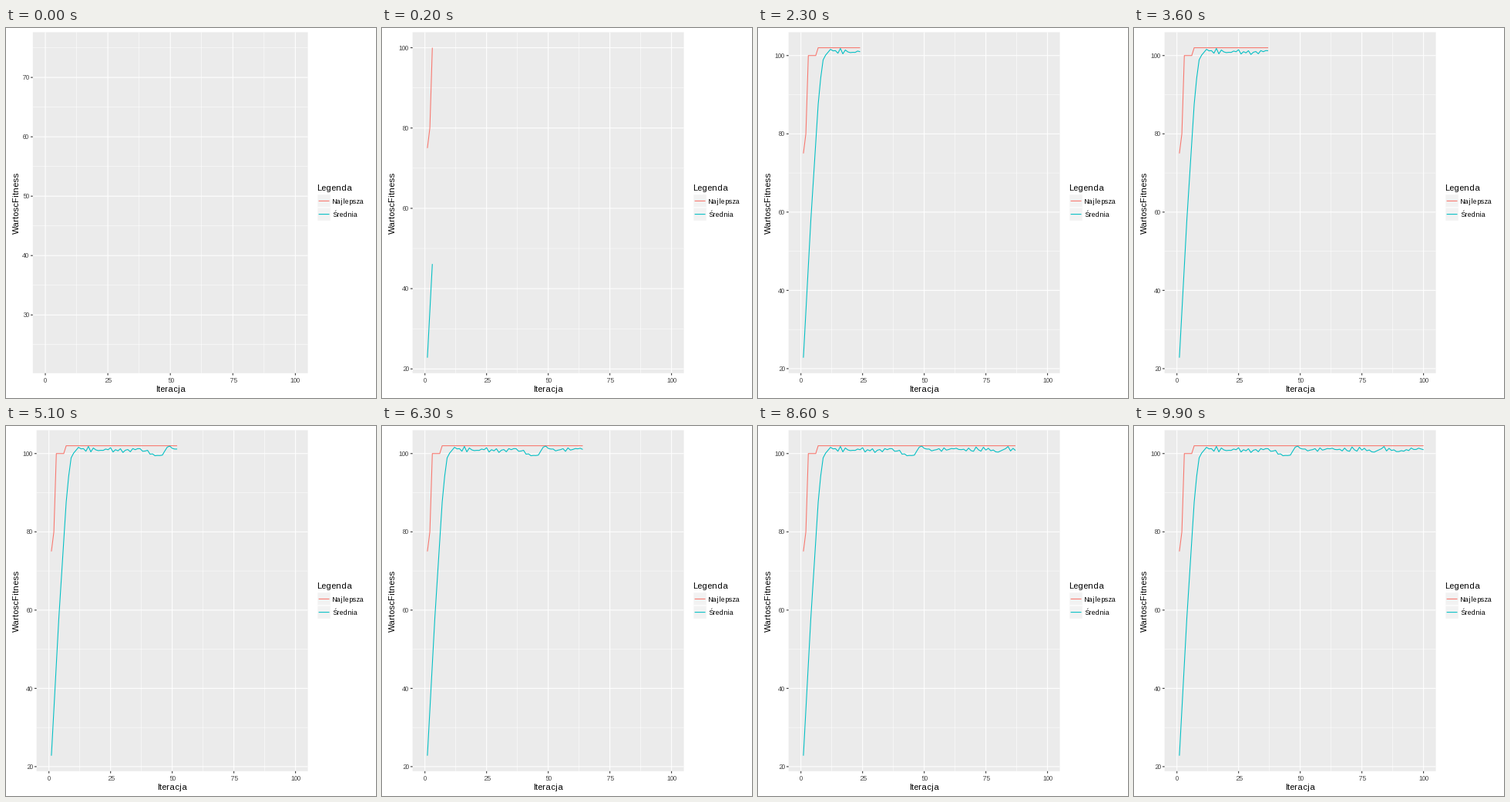
A matplotlib script for the animation above (10 s loop, 480x480 px).

```python
import numpy as np
import matplotlib.pyplot as plt
from matplotlib.animation import FuncAnimation
from matplotlib.patches import Rectangle

SIZE, DPI = 480, 100
PX = 72 / DPI  # points per pixel
TOP, BOTTOM, RIGHT = 5.5, 447.8, 391.6
RED, TEAL = "#F8766D", "#00BFC4"
THICK, THIN = 1.07, 0.53
SMALL, LARGE = 9, 11

plt.rcParams.update({
    "font.family": "Liberation Sans",
    "path.snap": False,
    "text.hinting": "force_autohint",
    "text.hinting_factor": 1,
    "lines.solid_capstyle": "butt",
    "lines.solid_joinstyle": "round",
})

# Best value climbs in jumps; the mean rises, then jitters on a plateau.
steps = np.arange(1, 101)
best = np.interp(steps, [1, 2, 3, 6, 7], [75, 80, 100, 100, 102])
mean = np.interp(steps,
                 [1, 4, 7, 8, 9, 10, 12, 13, 40, 41, 46, 48, 50, 52],
                 [22.8, 57.8, 87.6, 94.2, 98.9, 100.1, 101.6, 101.1,
                  100.9, 99.6, 99.8, 101.7, 101.5, 101])
jitter = np.random.default_rng(4).normal(0, 0.33, 100)
mean = np.minimum(mean + np.where(steps > 12, jitter, 0), 101.9)

fig = plt.figure(figsize=(SIZE / DPI, SIZE / DPI), dpi=DPI, facecolor="white")
ax = fig.add_axes([0, 0, 1, 1])


def line(x, y, color, width=THICK):
    ax.plot(x, y, color=color, lw=width * PX)


def label(x, y, text, size=SMALL, color="black", ha="left", rotation=0):
    ax.text(x, y, text, fontsize=size * PX, color=color, ha=ha,
            va="baseline", rotation=rotation, rotation_mode="anchor")


def box(x, y, w, h, face, edge="none"):
    ax.add_patch(Rectangle((x, y), w, h, facecolor=face, edgecolor=edge,
                           lw=THICK * PX))


def multiples(step, low, high, offset=0):
    values = np.arange(-1, 12) * step + offset
    return values[(values >= low) & (values <= high)]


def legend():
    label(403.4, 211, "Legenda", LARGE)
    for y, color, name in ((224.4, RED, "Najlepsza"), (241.6, TEAL, "Średnia")):
        box(403.9, y - 8.64, 17.28, 17.28, "#F2F2F2", "white")
        line([405.6, 419.5], [y, y], color)
        label(423.4, y + 3.4, name)


def draw(i):
    n = i + 1
    ax.clear()
    ax.set(xlim=(0, SIZE), ylim=(SIZE, 0))
    ax.axis("off")

    # The y range follows the data seen so far, padded by 5 %.
    low, high = mean[0], best[:n].max()
    pad = 0.05 * (high - low)
    low, high = low - pad, high + pad
    step = 10 if high < 100 else 20
    left = 34.8 if high < 100 else 39.7

    def sx(v):
        return left + (v + 5) / 110 * (RIGHT - left)

    def sy(v):
        return BOTTOM - (v - low) / (high - low) * (BOTTOM - TOP)

    box(left, TOP, RIGHT - left, BOTTOM - TOP, "#EBEBEB")
    xs, ys = multiples(25, -5, 105), multiples(step, low, high)
    grids = (
        (multiples(25, -5, 105, 12.5), multiples(step, low, high, step / 2), THIN),
        (xs, ys, THICK),
    )
    for gx, gy, width in grids:
        for v in gy:
            line([left, RIGHT], [sy(v)] * 2, "white", width)
        for v in gx:
            line([sx(v)] * 2, [TOP, BOTTOM], "white", width)

    if n > 1:
        line(sx(steps[:n]), sy(best[:n]), RED)
        line(sx(steps[:n]), sy(mean[:n]), TEAL)

    for v in xs:
        line([sx(v)] * 2, [BOTTOM, BOTTOM + 2.75], "#333333")
        label(sx(v), 460, f"{v:g}", color="#4D4D4D", ha="center")
    for v in ys:
        line([left - 2.75, left], [sy(v)] * 2, "#333333")
        label(left - 4.8, sy(v) + 3.2, f"{v:g}", color="#4D4D4D", ha="right")

    label((left + RIGHT) / 2, 472, "Iteracja", LARGE, ha="center")
    label(17, (TOP + BOTTOM) / 2, "WartoscFitness", LARGE, ha="center",
          rotation=90)
    legend()
    return []


anim = FuncAnimation(fig, draw, frames=100, interval=100, repeat=True,
                     repeat_delay=0, blit=False)
plt.show()
```
